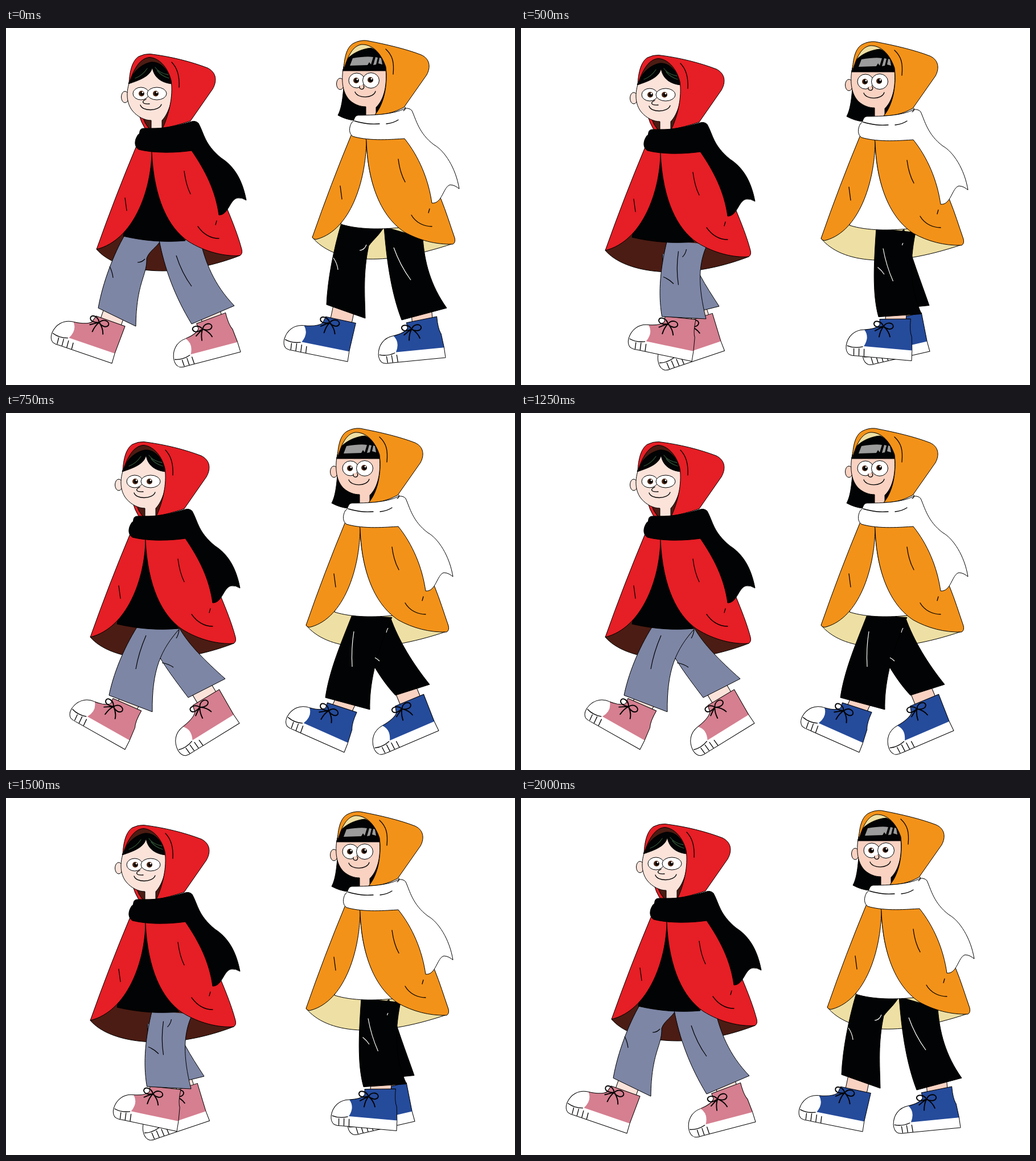
An HTML page that plays this animation: 894 px wide and 626 px high, repeating every 2.25 s.

```html
<!DOCTYPE html>
<html lang="en">
<head>
<meta charset="utf-8">
<title>Two walkers</title>
<style>
html, body { margin: 0; width: 100%; height: 100%; overflow: hidden; background: #fff; }
svg { display: block; width: 100%; height: 100%; }
path, ellipse, circle { stroke: #000; stroke-width: 1; stroke-linejoin: round; }
.red { --cape: #e61e25; --lining: #4b1c13; --skin: #fbe3da; --shoe: #d57f90; --pants: #7d86a5; --fold: #000; --scarf: #020304; }
.orange { --cape: #f39219; --lining: #eee0a4; --skin: #f9d2c2; --shoe: #254b9b; --pants: #020304; --fold: #fff; --scarf: #fff; }
.cape { fill: var(--cape); }
.lining { fill: var(--lining); }
.skin { fill: var(--skin); }
.upper { fill: var(--shoe); stroke: none; }
.edge { fill: none; }
.pants { fill: var(--pants); }
.scarf { fill: var(--scarf); }
.black { fill: #020304; }
.white { fill: #fff; }
.line { fill: none; stroke-width: 1.3; stroke-linecap: round; }
.lace { fill: none; stroke-width: 1.9; stroke-linecap: round; }
.fold { fill: none; stroke: var(--fold); stroke-width: 1.2; }
.bare { stroke: none; }
.iris { fill: #4a2411; stroke: none; }
.pose { visibility: hidden; animation: 2250ms step-end infinite; }
.p0 { animation-name: p0; }
.p1 { animation-name: p1; }
.p2 { animation-name: p2; }
.p3 { animation-name: p3; }
.p4 { animation-name: p4; }
@keyframes p0 { 0%, 88.88%, 100% { visibility: visible; } 11.11% { visibility: hidden; } }
@keyframes p1 { 0%, 22.22%, 88.88%, 100% { visibility: hidden; } 11.11%, 77.77% { visibility: visible; } }
@keyframes p2 { 0%, 33.33%, 77.77%, 100% { visibility: hidden; } 22.22%, 66.66% { visibility: visible; } }
@keyframes p3 { 0%, 44.44%, 66.66%, 100% { visibility: hidden; } 33.33%, 55.55% { visibility: visible; } }
@keyframes p4 { 0%, 55.55%, 100% { visibility: hidden; } 44.44% { visibility: visible; } }
</style>
</head>
<body>
<svg viewBox="0 0 894 626" preserveAspectRatio="none">
<defs>
  <path id="bow" class="lace" d="M-45-60C-50-70-64-70-62-62C-60-56-50-58-45-60C-40-70-28-68-28-61C-30-54-40-56-45-60M-59-51Q-52-56-45-60Q-50-53-51-41M-45-60Q-35-53-32-43"/>
  <g id="toe">
    <path class="white" d="M-88-46C-106-44-116-31-117-15Q-117-4-110 0Q-104 2-98 1L0 0L-1-18"/>
    <path class="line" d="M-115-15Q-102-11-88-16M-103-11L-102 0M-94-12L-93 0M-85-12L-84 0"/>
  </g>
  <!-- shoes: origin at the bottom of the heel, toe to the left -->
  <g id="far">
    <path class="skin" d="M-45-64V-96H-7V-64Z"/>
    <use href="#toe"/>
    <path class="upper" d="M-54-69L0-69L-1-18L-86-17Q-77-34-88-46Q-64-49-57-57Z"/>
    <path class="edge" d="M-88-46Q-64-49-57-57L-54-69L0-69L-1-18"/>
    <path class="line" d="M-76-11L-75 0"/>
    <use href="#bow"/>
  </g>
  <g id="near">
    <path class="skin" d="M-53-62V-94H-17V-65Z"/>
    <use href="#toe"/>
    <path class="upper" d="M-63-67L-9-73Q-9-51-4-42L-1-18L-86-17Q-77-34-88-46Q-68-49-62-57Z"/>
    <path class="edge" d="M-88-46Q-68-49-62-57L-63-67L-9-73Q-9-51-4-42L-1-18"/>
    <use href="#bow" x="-10" y="5"/>
  </g>

  <path id="red-back" class="lining" d="M159 388C195 430 300 442 411 399L330 320H200Z"/>
  <g id="red-front">
    <path class="black" d="M256 218L215 320L206 365C245 374 280 376 315 373C275 330 258 280 256 218Z"/>
    <path class="cape" d="M229 207Q192 295 159 388C224 372 255 285 256 218L250 195Z"/>
    <path class="cape" d="M256 218C260 300 285 350 320 374C350 393 385 401 411 399Q416 396 414 388C408 365 398 340 388 316L330 195H250Z"/>
    <path class="line" d="M313 251Q316 275 324 291M209 298L212 320M337 348C347 362 360 369 374 369M370 338L368 345"/>
    <path class="cape" d="M233 150Q237 165 244 176H262L250 155Z"/>
    <path class="lining" d="M240 156Q244 168 251 176H284L290 140Z"/>
    <path class="lining" d="M216 98C222 70 236 49 254 50C275 54 290 72 292 98Z"/>
    <ellipse class="skin" cx="209" cy="121" rx="6.5" ry="10"/>
    <path class="skin" d="M217 94C209 118 214 135 222 145C231 156 244 162 255 162V176H274V162C286 150 295 122 291 94L256 68Z"/>
    <path class="black" d="M215 98C222 78 236 64 254 60C272 58 286 74 292 98C272 96 259 86 257 68C255 84 236 91 215 98Z"/>
    <path class="line" style="stroke:#2f5135" d="M227 88Q240 83 248 71M262 69Q269 79 285 82M266 75Q273 84 286 88"/>
    <ellipse class="white" cx="237" cy="115" rx="14" ry="11"/>
    <ellipse class="white" cx="265" cy="115" rx="17" ry="11"/>
    <circle class="iris" cx="238" cy="115" r="5"/><circle class="iris" cx="263" cy="115" r="5"/>
    <circle class="black bare" cx="239" cy="115" r="3"/><circle class="black bare" cx="264" cy="115" r="3"/>
    <circle class="white bare" cx="240" cy="113" r="1.4"/><circle class="white bare" cx="265" cy="113" r="1.4"/>
    <path class="line" d="M246 125C238 128 238 134 252 133M236 135C239 146 268 147 273 134"/>
    <path class="cape" d="M216 98C217 75 222 57 233 50Q243 45 253 45.5C290 50 325 59 354 70C370 78 371 93 363 107L324 163C306 169 290 173 275 176C286 152 294 120 290 92C284 68 268 52 252 51.5C235 53 224 72 216 98Z"/>
    <path class="line" d="M291 60C301 70 305 85 304 104"/>
    <path class="scarf" d="M241 176C232 177 237 186 232 187C225 197 225 208 233 213C260 220 300 219 326 215C350 250 368 285 374 328C391 328 393 300 407 298Q414 297 422 302C415 265 400 242 378 228C348 203 349 187 338 167Q333 162 326 164C300 172 270 178 241 176Z"/>
  </g>

  <path id="orange-back" class="lining" d="M538 367C575 411 660 420 785 378L710 310H580Z"/>
  <g id="orange-front">
    <path class="white" d="M633 198L598 300L588 344C620 354 660 353 691 350C650 310 635 260 633 198Z"/>
    <path class="cape" d="M607 186Q570 275 538 367Q541 372 547 370C604 354 632 270 633 198L630 180Z"/>
    <path class="cape" d="M633 198C636 285 665 335 700 358C725 372 755 380 785 379Q790 376 788 368C780 345 773 322 764 300L700 180H630Z"/>
    <path class="line" d="M689 230Q692 254 701 270M587 277L590 300M712 328C720 342 735 348 748 348M744 317L742 324"/>
    <path class="black" d="M594 90C592 120 590 140 583 153Q598 161 612 162H660L669 110Z"/>
    <path class="lining" d="M593 75C600 45 610 28 625 28C650 30 665 50 668 75Z"/>
    <ellipse class="skin" cx="587" cy="98" rx="6.5" ry="10"/>
    <path class="skin" d="M592 72C588 100 594 117 604 127C613 135 623 138 632 138V156H650V139C662 128 670 105 667 72Z"/>
    <path class="black" d="M592 75Q593 62 598 56C606 46 622 37 641 35C656 40 666 56 667 75Z"/>
    <path class="bare" fill="#9c9c9c" d="M604 66L609 53Q633 49 645 51L641 64L638 60L635 65ZM649 51L653 52L650 64L645 65ZM656 52L659 53L661 64L654 62Z"/>
    <ellipse class="white" cx="616" cy="92" rx="14" ry="13"/>
    <ellipse class="white" cx="641" cy="92" rx="14.5" ry="13.5"/>
    <circle class="iris" cx="615" cy="92" r="5"/><circle class="iris" cx="640" cy="91" r="5"/>
    <circle class="black bare" cx="616" cy="92" r="3.5"/><circle class="black bare" cx="641" cy="91" r="3.5"/>
    <circle class="white bare" cx="617" cy="90" r="1.5"/><circle class="white bare" cx="642" cy="89" r="1.5"/>
    <circle class="skin bare" cx="625" cy="104" r="4"/>
    <path class="line" d="M621 102A4 4 0 1 0 628 101M613 112C617 124 645 124 649 111"/>
    <path class="cape" d="M593 75C594 52 598 34 610 27Q621 21 633 22C670 29 703 37 729 47C745 54 746 69 739 82L699 139C680 149 665 152 648 152C664 134 671 98 667 68C658 42 642 28 624 29C608 32 600 50 593 75Z"/>
    <path class="line" d="M667 37C679 48 682 60 680 81"/>
    <path class="scarf" d="M618 153C610 155 613 163 607 166C602 175 602 185 609 190C640 199 680 195 700 194C725 225 742 265 748 307C766 309 768 278 780 275Q788 275 796 282C790 245 770 215 752 205C725 185 720 160 713 145Q709 140 701 141C680 152 645 153 618 153Z"/>
    <path class="line" d="M612 163C630 168 640 169 656 168M668 168Q680 167 689 161M701 139Q702 143 698 145"/>
  </g>
</defs>
<g id="stage"></g>
</svg>
<script>
// Legs: far / near = shoe "heelX heelY angle", farLeg / nearLeg = trouser outlines, folds = crease lines.
const red = [
  { far: "186 588 19.5", near: "412 568 -14",
    farLeg: "M208 364C190 395 170 445 162 491L228 523C229 445 248 435 247 404C252 390 264 386 272 372",
    nearLeg: "M269 372C278 420 296 470 326 519L401 487C365 450 350 410 341 372",
    folds: "M299 399Q309 430 326 453M182 418Q187 428 188 438M231 411Q239 411 244 405" },
  { far: "305 588 -5", near: "391 579 -5",
    farLeg: "M229 370C218 410 230 460 242 510L311 510C297 465 286 435 279 374",
    nearLeg: "M282 372C286 420 292 465 314 517L393 496C365 455 350 410 350 380",
    folds: "M307 393Q311 425 325 452M226 435Q235 441 242 451M277 396Q275 404 268 408" },
  null,
  { far: "410 544 -31", near: "209 590 30",
    farLeg: "M268 424C277 442 298 470 320 499L385 466C350 435 320 405 305 378",
    nearLeg: "M231 374C205 415 188 460 181 495L257 524C256 450 272 415 305 378",
    folds: "M246 390Q233 420 228 449M274 438Q286 440 294 446M304 380Q303 389 299 395" },
  { far: "440 510 -50", near: "180 600 15",
    farLeg: "M262 390C275 440 300 475 336 509L381 450C350 430 330 400 318 372",
    nearLeg: "M210 364C190 400 172 450 160 500L227 524C230 470 245 410 300 372",
    folds: "M234 388Q219 420 214 450M272 432Q282 434 290 441" }
];
const orange = [
  { far: "600 585 12", near: "772 578 -5",
    farLeg: "M589 342C575 390 565 440 563 485L631 509C630 465 627 430 637 382C646 370 657 362 664 348",
    nearLeg: "M664 348C668 400 675 460 695 512L774 491C745 450 735 410 732 368",
    folds: "M681 385Q692 416 711 442M575 403Q582 413 583 424M621 390Q630 389 633 380" },
  { far: "676 577 -2", near: "778 572 -13",
    farLeg: "M603 346C603 400 610 460 618 491L690 497C690 450 680 400 670 348",
    nearLeg: "M640 348C650 420 665 480 695 514L768 483C730 440 715 400 708 358",
    folds: "M661 390Q677 420 699 443M605 410Q614 418 620 429M671 377Q671 377 671 377" },
  null,
  { far: "760 557 -22.5", near: "594 595 24.5",
    farLeg: "M640 432C652 455 668 478 684 495L744 476C715 440 690 400 675 358",
    nearLeg: "M608 354C590 400 568 450 561 499L639 520C638 480 648 425 678 358",
    folds: "M611 383Q606 414 608 445M648 429Q652 431 656 435M671 377Q669 380 668 385" },
  { far: "822 510 -50", near: "600 597 10",
    farLeg: "M640 390C655 440 685 480 718 509L763 450C735 425 715 395 705 362",
    nearLeg: "M589 342C575 400 565 450 565 497L635 517C632 470 640 420 680 348",
    folds: "M607 383Q598 414 599 445M662 430Q667 432 671 437" }
];
const shift = ["0 0", "7 2", "-11 2", "-11 5", "0 0"];

// Halfway between two strings of the same shape.
const number = /-?\d+(\.\d+)?/g;
function halfway(a, b) {
  const ends = b.match(number);
  let i = 0;
  return a.replace(number, n => (+n + +ends[i++]) / 2);
}
for (const walk of [red, orange]) {
  walk[2] = {};
  for (const key in walk[1]) walk[2][key] = halfway(walk[1][key], walk[3][key]);
}

function shoe(kind, place) {
  const [x, y, angle] = place.split(" ");
  return `<use href="#${kind}" transform="translate(${x} ${y}) rotate(${angle})"/>`;
}
const leg = d => `<path class="pants" d="${d}"/>`;
function walker(name, p, i) {
  const part = side => `<use href="#${name}-${side}" transform="translate(${shift[i]})"/>`;
  return `<g class="${name}">` + part("back") +
    shoe("far", p.far) + leg(p.farLeg) + shoe("near", p.near) + leg(p.nearLeg) +
    `<path class="fold" d="${p.folds}"/>` + part("front") + "</g>";
}
document.getElementById("stage").innerHTML = shift.map((_, i) =>
  `<g class="pose p${i}">${walker("red", red[i], i)}${walker("orange", orange[i], i)}</g>`).join("");
</script>
</body>
</html>
```
